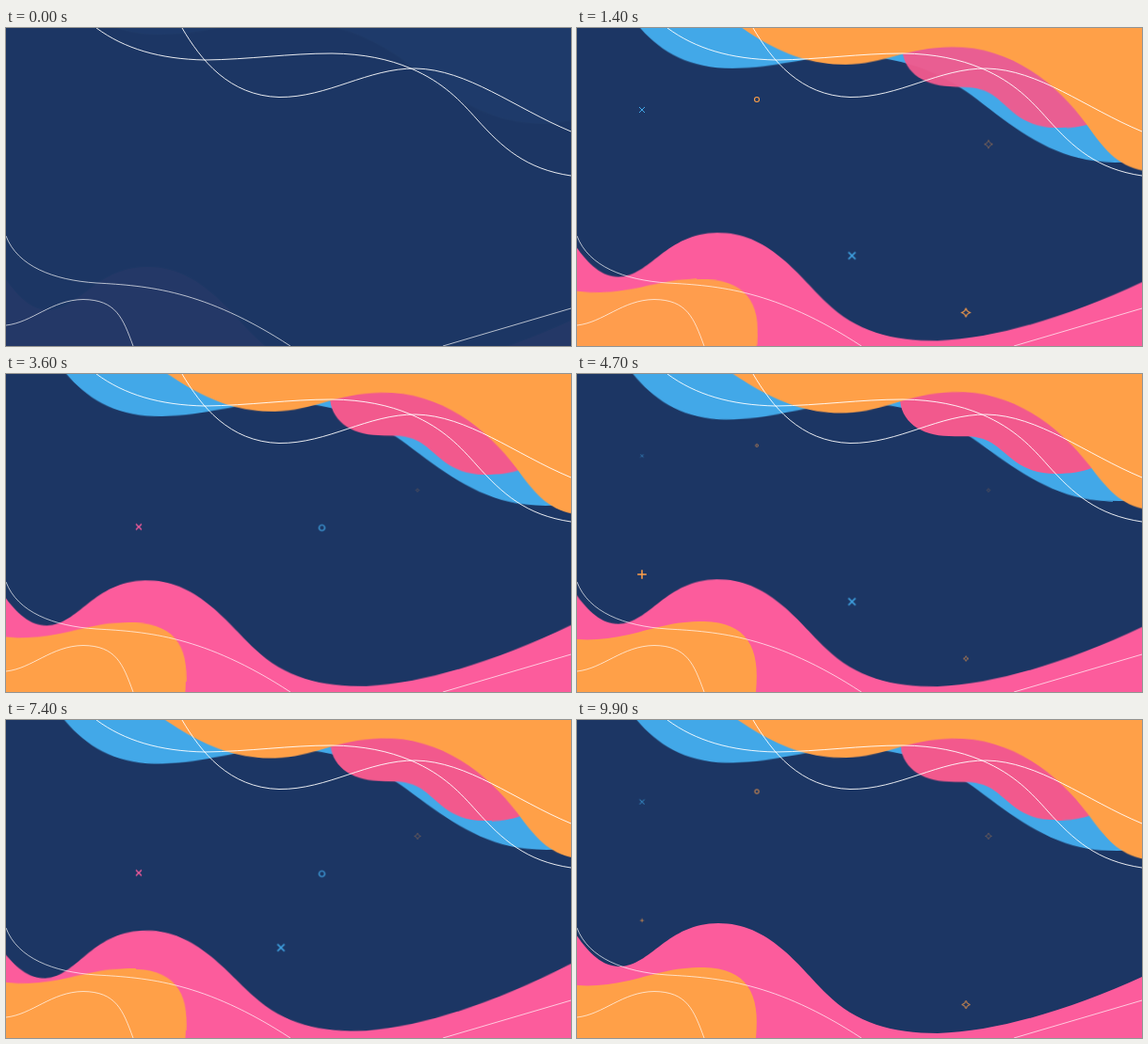
These frames come from a looping animation (600x338 px, 10 s). An HTML page:

```html
<!DOCTYPE html>
<html lang="en">
<head>
<meta charset="utf-8">
<title>Flowing waves</title>
<style>
  html, body { margin: 0; width: 100%; height: 100%; overflow: hidden; background: #1c3664; }
  svg { display: block; width: 100%; height: 100%; }

  .intro, .wave, .mark { animation: 10s linear infinite; }
  .wave { animation-timing-function: ease-in-out; }
  .top { --y: -40px; }
  .bottom { --y: 40px; }

  /* Staggered entrances */
  .first { animation-name: first; }
  .second { animation-name: second; }
  .third { animation-name: third; }
  @keyframes first {
    0% { opacity: .035; transform: translateY(calc(var(--y) * .95)); }
    9.5%, 100% { opacity: 1; transform: none; }
  }
  @keyframes second {
    0%, 2% { opacity: 0; transform: translateY(var(--y)); }
    12%, 100% { opacity: 1; transform: none; }
  }
  @keyframes third {
    0%, 4.5% { opacity: 0; transform: translateY(var(--y)); }
    14.5%, 100% { opacity: 1; transform: none; }
  }

  /* Rocking of the waves */
  .sky { transform-origin: 340px 10px; animation-name: rock-top; }
  .sun { transform-origin: 366px 10px; animation-name: rock-top; }
  .bean { transform-origin: 450px 95px; animation-name: rock-bean; }
  .hill { transform-origin: 322px 338px; animation-name: rock-hill; }
  .dune { transform-origin: 90px 345px; animation-name: rock-dune; }
  @keyframes rock-top {
    0% { transform: rotate(-1.3deg); }
    8% { transform: rotate(-.85deg); }
    24% { transform: rotate(0deg); }
    47% { transform: rotate(-2.4deg); animation-timing-function: ease-out; }
    64% { transform: rotate(-3.1deg); }
    85% { transform: rotate(-.25deg); }
    99%, 100% { transform: rotate(-1.45deg); }
  }
  @keyframes rock-bean {
    0% { transform: rotate(1.6deg); }
    8% { transform: rotate(2deg); }
    24% { transform: rotate(2deg); }
    47% { transform: rotate(0deg); }
    64% { transform: rotate(2.5deg); }
    85% { transform: rotate(-.1deg); }
    99%, 100% { transform: rotate(.5deg); }
  }
  @keyframes rock-hill {
    0% { transform: rotate(0deg); }
    8% { transform: rotate(-.1deg); }
    24% { transform: rotate(-1.55deg); }
    47% { transform: rotate(-.75deg); }
    64% { transform: rotate(-2.95deg); animation-timing-function: ease-in; }
    85% { transform: rotate(-1.65deg); animation-timing-function: ease-out; }
    99%, 100% { transform: rotate(0deg); }
  }
  @keyframes rock-dune {
    0% { transform: rotate(1.6deg); }
    8% { transform: rotate(2.2deg); }
    24% { transform: rotate(3.3deg); }
    47% { transform: rotate(0deg); animation-timing-function: ease-in; }
    64% { transform: rotate(1.5deg); animation-timing-function: ease-out; }
    85% { transform: rotate(2deg); }
    99%, 100% { transform: rotate(0deg); }
  }

  .lines { fill: none; stroke: #fff; stroke-width: .9; }
  .thin { stroke-width: .68; }

  /* Twinkling marks */
  .marks { fill: none; }
  .orange { stroke: #ffa048; }
  .blue { stroke: #42a8e8; }
  .pink { stroke: #fc5c9c; }
  .a { animation-name: twinkle-a; }
  .b { animation-name: twinkle-b; }
  .c { animation-name: twinkle-c; }
  .d { animation-name: twinkle-d; }
  .e { animation-name: twinkle-e; }
  @keyframes twinkle-a {
    0%, 4.2%, 24.7%, 44%, 64%, 84% { transform: scale(0); }
    9.5%, 19%, 49.5%, 59%, 90%, 97% { transform: scale(1); }
    100% { transform: scale(.8); }
  }
  @keyframes twinkle-b {
    0%, 21.5%, 46.5%, 61.5%, 88%, 100% { transform: scale(0); }
    25%, 43%, 65.2%, 84% { transform: scale(1); }
  }
  @keyframes twinkle-c {
    0%, 3%, 40%, 42%, 82%, 90% { transform: scale(0); }
    8% { transform: scale(.4); }
    22%, 26%, 62%, 66% { transform: scale(1); }
    47% { transform: scale(.3); }
    99%, 100% { transform: scale(.5); }
  }
  @keyframes twinkle-d {
    0%, 4%, 28%, 36%, 57%, 67%, 86%, 100% { transform: scale(0); }
    12%, 20%, 43%, 50%, 73%, 80% { transform: scale(1); }
  }
  @keyframes twinkle-e {
    0%, 37%, 59%, 80% { transform: scale(0); }
    45%, 51%, 87%, 94% { transform: scale(1); }
    100% { transform: scale(.3); }
  }
</style>
</head>
<body>
<svg viewBox="0 0 600 338" preserveAspectRatio="none">
  <defs>
    <path id="cross" d="M-3 -3L3 3M3 -3L-3 3"/>
    <path id="spark" d="M0 -6.6Q1.1 -1.1 6.6 0Q1.1 1.1 0 6.6Q-1.1 1.1 -6.6 0Q-1.1 -1.1 0 -6.6Z"/>
  </defs>

  <g class="marks">
    <g transform="translate(69 87)"><use class="mark a blue" href="#cross"/></g>
    <g transform="translate(191 76)"><circle class="mark a orange" r="2.5" stroke-width="1.1"/></g>
    <g transform="translate(413 302.5) scale(.75)"><use class="mark a orange" href="#spark" stroke-width="1.4"/></g>
    <g transform="translate(141 162.5)"><use class="mark b pink" href="#cross" stroke-width="1.3"/></g>
    <g transform="translate(335.5 163.5)"><circle class="mark b blue" r="3" stroke-width="1.2"/></g>
    <g transform="translate(437 123.5)"><use class="mark c orange" href="#spark" stroke-width="1" stroke-opacity=".62"/></g>
    <g transform="translate(292 242) scale(1.25)"><use class="mark d blue" href="#cross" stroke-width="1.3"/></g>
    <g transform="translate(69 213)"><path class="mark e orange" d="M-4.8 0H4.8M0 -4.8V4.8" stroke-width="1.5"/></g>
  </g>

  <g class="intro top first">
    <path class="wave sky" fill="#42a8e8" d="M20 -90C45 -30 75 41 165 41C212 41 245 29 285 29C345 29 385 48 418 72C462 106 505 145 570 145C610 145 640 125 660 110V-90Z"/>
  </g>
  <g class="intro top third">
    <path class="wave bean" fill="#f2598d" d="M345 -90L343 25C343 50 365 66 395 66C412 67 424 64 440 73C458 84 470 106 508 106C540 106 562 98 562 80V-90Z"/>
  </g>
  <g class="intro top second">
    <path class="wave sun" fill="#ffa048" d="M118 -48C164 -10 215 38 285 38C325 38 350 20.5 398 20.5C462 20.5 510 62 540 104C562 136 575 150 605 155L680 165V-80H118Z"/>
  </g>

  <g class="intro bottom first">
    <path class="wave hill" fill="#fc5c9c" d="M-30 170C-15 205 10 262 45 262C78 262 96 216 150 216C204 216 234 260 265 291C296 322 335 333 383 333C450 331 530 305 600 273L660 248V420H-30Z"/>
  </g>
  <g class="intro bottom third">
    <path class="wave dune" fill="#ffa048" d="M-30 278C0 284 25 284 55 277S100 263 135 263C180 264 195 290 190 338L189 400H-30Z"/>
  </g>

  <g class="lines">
    <path d="M96 0C126 22 163 33 211 34C258 33.5 300 27 346 27C380 27.5 406 33 430 43C465 58 483 78 500 97C527 127 552 150 600 157"/>
    <path d="M187 0C207 34 237 72 290 73.5C342 74 384 42.5 435 43C490 44 540 85 600 110"/>
    <path class="thin" d="M0 221C12 253 50 268 96 271C150 274 210 278 302 338"/>
    <path class="thin" d="M0 316C28 313 48 289 82 288.5C117 289 124 308 135 338"/>
    <path class="thin" d="M464 338L600 298"/>
  </g>
</svg>
</body>
</html>
```
